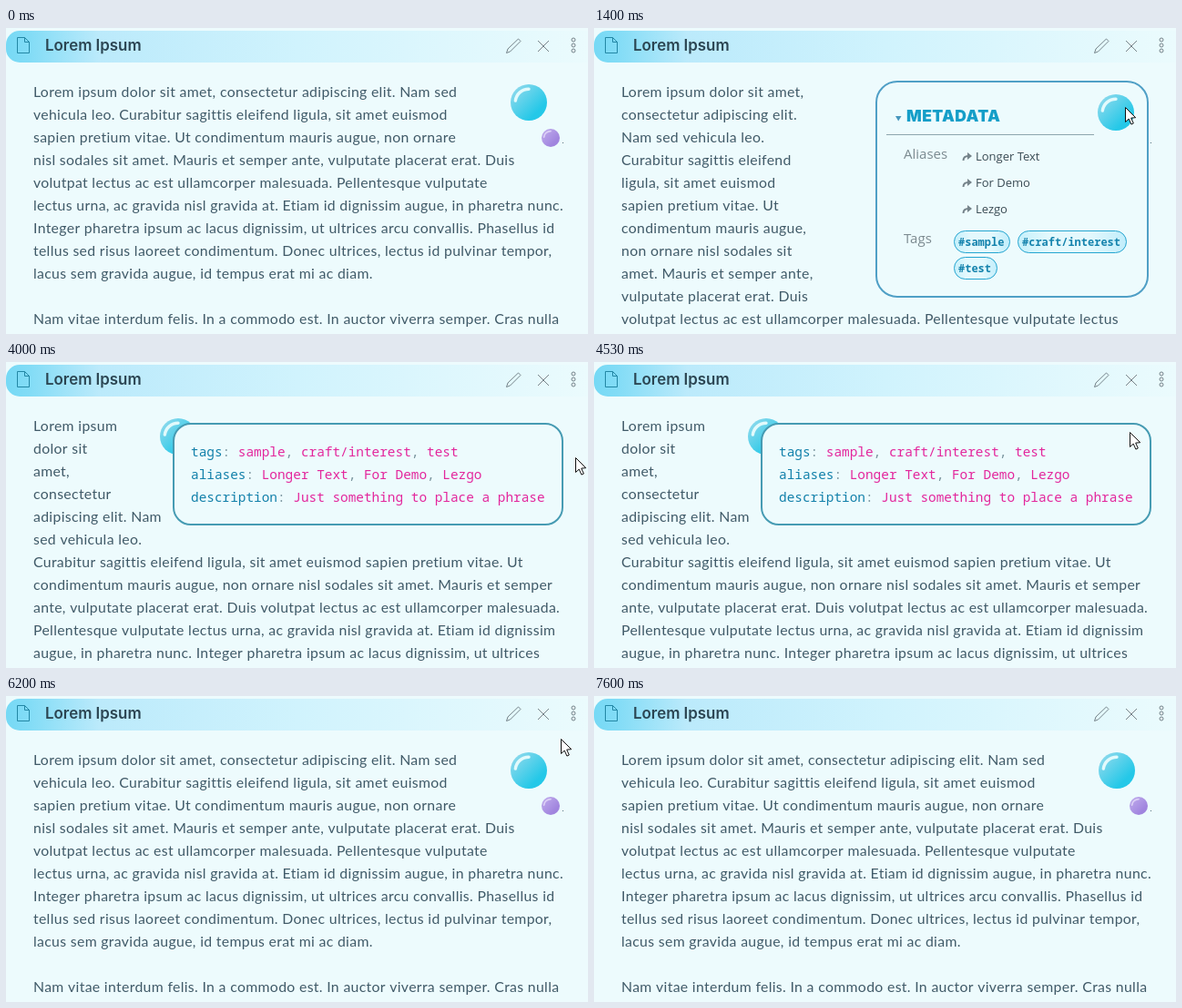
An HTML page with a canvas that plays this animation: 639 px wide and 337 px high, repeating every 9070 ms.

```html
<!DOCTYPE html>
<html lang="en">
<head>
<meta charset="utf-8">
<title>Note with hover bubbles</title>
<style>
html, body { margin: 0; width: 100%; height: 100%; overflow: hidden; background: #edfbfd; }
canvas { display: block; width: 639px; height: 337px; }
</style>
</head>
<body>
<canvas id="stage"></canvas>
<script>
const W = 639, H = 337, LOOP = 9070, STEP = 200 / 3;
const BG = '#edfbfd', GRAY = '#75838a', TEAL = '#2387a5';
const BODY = '15.8px Lato, sans-serif';
const CODE = '14.4px "Noto Sans Mono", monospace';
const LABEL = '15px "Open Sans", sans-serif';

const BLUE = { x: 574, y: 82, r: 20 };
const PURPLE = { x: 598, y: 121, r: 10 };
const META = { x: 310, y: 59, w: 298, h: 237 };
const SOURCE = { x: 184, y: 68, w: 427, h: 111 };

const canvas = document.getElementById('stage');
const ctx = canvas.getContext('2d');
const ratio = window.devicePixelRatio || 1;
canvas.width = W * ratio;
canvas.height = H * ratio;
ctx.scale(ratio, ratio);

const TEXT = {
  closed: [
    'Lorem ipsum dolor sit amet, consectetur adipiscing elit. Nam sed',
    'vehicula leo. Curabitur sagittis eleifend ligula, sit amet euismod',
    'sapien pretium vitae. Ut condimentum mauris augue, non ornare',
    'nisl sodales sit amet. Mauris et semper ante, vulputate placerat erat. Duis',
    'volutpat lectus ac est ullamcorper malesuada. Pellentesque vulputate',
    'lectus urna, ac gravida nisl gravida at. Etiam id dignissim augue, in pharetra nunc.',
    'Integer pharetra ipsum ac lacus dignissim, ut ultrices arcu convallis. Phasellus id',
    'tellus sed risus laoreet condimentum. Donec ultrices, lectus id pulvinar tempor,',
    'lacus sem gravida augue, id tempus erat mi ac diam.',
    '',
    'Nam vitae interdum felis. In a commodo est. In auctor viverra semper. Cras nulla'
  ],
  meta: [
    'Lorem ipsum dolor sit amet,',
    'consectetur adipiscing elit.',
    'Nam sed vehicula leo.',
    'Curabitur sagittis eleifend',
    'ligula, sit amet euismod',
    'sapien pretium vitae. Ut',
    'condimentum mauris augue,',
    'non ornare nisl sodales sit',
    'amet. Mauris et semper ante,',
    'vulputate placerat erat. Duis',
    'volutpat lectus ac est ullamcorper malesuada. Pellentesque vulputate lectus'
  ],
  source: [
    'Lorem ipsum',
    'dolor sit',
    'amet,',
    'consectetur',
    'adipiscing elit. Nam',
    'sed vehicula leo.',
    'Curabitur sagittis eleifend ligula, sit amet euismod sapien pretium vitae. Ut',
    'condimentum mauris augue, non ornare nisl sodales sit amet. Mauris et semper',
    'ante, vulputate placerat erat. Duis volutpat lectus ac est ullamcorper malesuada.',
    'Pellentesque vulputate lectus urna, ac gravida nisl gravida at. Etiam id dignissim',
    'augue, in pharetra nunc. Integer pharetra ipsum ac lacus dignissim, ut ultrices'
  ]
};

// Pointer moves, in ticks: each eases from the last stop, optionally bent towards a point
const ENTRY = [626, 0];
const MOVES = [
  { from: 11, until: 24, to: [580, 89], bend: [590, 88] },
  { from: 32, until: 36, to: [617, 104] },
  { from: 41, until: 46, to: [580, 118] },
  { from: 56, until: 61, to: [630, 104] },
  { from: 61, until: 65, to: [598, 118] },
  { from: 65, until: 71, to: [580, 82], bend: [587, 54] },
  { from: 80, until: 89, to: [626, 68], bend: [598, 85] },
  { from: 89, until: 100, to: [562, 61], bend: [600, 20] },
  { from: 100, until: 104, to: [580, 84] },
  { from: 111, until: 114, to: [620, 24] }
];
const LEAVE = MOVES[MOVES.length - 1].until;

const smooth = k => k * k * (3 - 2 * k);

function tipAt(tick) {
  if (tick < MOVES[0].from || tick >= LEAVE) return null;
  let stop = ENTRY;
  for (const { from, until, to, bend } of MOVES) {
    if (tick <= from) break;
    if (tick < until) {
      const u = smooth((tick - from) / (until - from)), v = 1 - u;
      return stop.map((a, i) => {
        const mid = bend ? bend[i] : (a + to[i]) / 2;
        return Math.round(v * v * a + 2 * u * v * mid + u * u * to[i]);
      });
    }
    stop = to;
  }
  return stop;
}

const near = ([x, y], ball, pad) => Math.hypot(x - ball.x, y - ball.y) < ball.r + pad;
const inside = ([x, y], p) =>
  x >= p.x - 1 && x <= p.x + p.w + 1 && y >= p.y - 1 && y <= p.y + p.h + 1;

// A bubble opens its panel; leaving the panel closes it
function nextView(view, tip) {
  if (!tip) return 'closed';
  if (view === 'meta' && inside(tip, META)) return view;
  if (view === 'source' && inside(tip, SOURCE)) return view;
  if (view !== 'closed') return 'closed';
  if (near(tip, BLUE, 6)) return 'meta';
  return near(tip, PURPLE, 4) ? 'source' : 'closed';
}

const views = ['closed'];
for (let tick = 0; tick < LOOP / STEP; tick++) {
  views.push(nextView(views[tick], tipAt(tick)));
}

function write(str, x, y, font, color, spacing = 0) {
  ctx.font = font;
  ctx.letterSpacing = spacing + 'px';
  ctx.fillStyle = color;
  ctx.fillText(str, x, y);
}

function paint(shape, fill, stroke, width = 1) {
  if (fill) {
    ctx.fillStyle = fill;
    ctx.fill(shape);
  }
  if (stroke) {
    ctx.strokeStyle = stroke;
    ctx.lineWidth = width;
    ctx.stroke(shape);
  }
}

const draw = (d, ...style) => paint(new Path2D(d), ...style);

function box({ x, y, w, h }, r, ...style) {
  const shape = new Path2D();
  shape.roundRect(x, y, w, h, r);
  paint(shape, ...style);
}

function arc(x, y, r, from = 0, to = 2) {
  const shape = new Path2D();
  shape.arc(x, y, r, from * Math.PI, to * Math.PI);
  return shape;
}

function blend(x0, y0, x1, y1, stops) {
  const g = ctx.createLinearGradient(x0, y0, x1, y1);
  stops.forEach(([at, color]) => g.addColorStop(at, color));
  return g;
}

function bubble(x, y, r, light, dark, shine) {
  const d = r * 0.7;
  paint(arc(x, y, r), blend(x - d, y - d, x + d, y + d, [[0, light], [0.85, dark]]));
  ctx.lineCap = 'round';
  paint(arc(x, y, r * 0.74, 1.04, 1.5), null, shine, r * 0.17);
  ctx.lineCap = 'butt';
}

const blueBubble = (x, y) => bubble(x, y, BLUE.r, '#84d8ec', '#24c8e8', '#e2fafc');

function header() {
  box({ x: 0, y: 3, w: W, h: 35 }, [15, 0, 0, 15], blend(0, 0, W, 0,
    [[0, '#76d9f5'], [0.04, '#82dcf6'], [0.16, '#bbeafb'], [0.5, '#d0f3fd'], [1, '#ebfbfd']]));
  draw('M12.5 10.5h8l5 5v12h-13zM20.5 10.5v5h5', null, TEAL);
  write('Lorem Ipsum', 43, 25, '600 16.9px Inter, sans-serif', '#2b4552');
  draw('M549.5 27.5l1.5-4.5 11.5-11 2.5 2.5-11.5 11.5z', null, GRAY);
  draw('M584 14l12 12m0-12l-12 12', null, GRAY);
  for (let i = 0; i < 3; i++) paint(arc(623, 13 + 6 * i, 2), null, GRAY);
}

function closedView() {
  blueBubble(BLUE.x, BLUE.y);
  bubble(PURPLE.x, PURPLE.y, PURPLE.r, '#bba6ea', '#a084de', '#dccff6');
}

function pill(label, x, y, w) {
  const fill = blend(x, 0, x + w, 0,
    [[0, '#c4f0fb'], [0.3, '#e4f9fd'], [0.65, '#e4f9fd'], [1, '#c0edfb']]);
  box({ x: x + 0.5, y: y + 0.5, w: w - 1, h: 24 }, 12, fill, '#25a5d0');
  write(label, x + 5, y + 17, 'bold 12px "Noto Sans Mono", monospace', '#1583ad');
}

function aliasRow(label, y) {
  draw(`M405.5 ${y}q0-5 5.5-5`, null, GRAY, 2);
  draw(`M410 ${y - 9}l5 4-5 4z`, GRAY);
  write(label, 419, y, '13px "Open Sans", sans-serif', '#3a4b54');
}

function metaView() {
  box(META, 23, BG, '#4f9fc6', 2);
  draw('M331 97h6.5l-3.3 5.5z', '#4696bd');
  write('METADATA', 343, 103, '900 17.5px Inter, sans-serif', '#159ec8', 0.4);
  draw('M321 117.5h228', null, '#8da5ad');
  blueBubble(573, 93);

  write('Aliases', 340, 144, LABEL, '#7c8a90');
  write('Tags', 340, 237, LABEL, '#7c8a90');
  ['Longer Text', 'For Demo', 'Lezgo'].forEach((name, i) => aliasRow(name, 146 + 29 * i));
  pill('#sample', 395, 223, 62);
  pill('#craft/interest', 465, 223, 120);
  pill('#test', 395, 252, 48);
}

function codeLine(key, values, y) {
  let x = 203;
  const put = (str, color) => {
    write(str, x, y, CODE, color);
    x += ctx.measureText(str).width;
  };
  put(key, '#1280aa');
  put(': ', '#78939d');
  values.forEach((value, i) => {
    if (i) put(', ', '#78939d');
    put(value, '#e3269c');
  });
}

function sourceView() {
  blueBubble(189, 82);
  box(SOURCE, 19, BG, '#469bb3', 2);
  codeLine('tags', ['sample', 'craft/interest', 'test'], 104);
  codeLine('aliases', ['Longer Text', 'For Demo', 'Lezgo'], 129);
  codeLine('description', ['Just something to place a phrase'], 154);
}

function pointer(tip) {
  if (!tip) return;
  ctx.save();
  ctx.translate(tip[0] + 0.5, tip[1] + 0.5);
  draw('M0 0v16l3.7-3.4 2.7 6 2.4-1.1-2.6-5.9 5-.4z', '#fff', '#111');
  ctx.restore();
}

const DRAW = { closed: closedView, meta: metaView, source: sourceView };

function render(time) {
  const tick = Math.floor((time % LOOP + 4) / STEP);
  const view = views[tick];
  ctx.fillStyle = BG;
  ctx.fillRect(0, 0, W, H);
  header();
  TEXT[view].forEach((str, i) => write(str, 30, 75.5 + 25 * i, BODY, '#405a68', 0.33));
  ctx.fillStyle = '#55707c';
  ctx.fillRect(611, 126, 1, 1);
  DRAW[view]();
  pointer(tipAt(tick));
}

const start = performance.now();
function loop() {
  render(performance.now() - start);
  requestAnimationFrame(loop);
}
loop();
</script>
</body>
</html>
```
